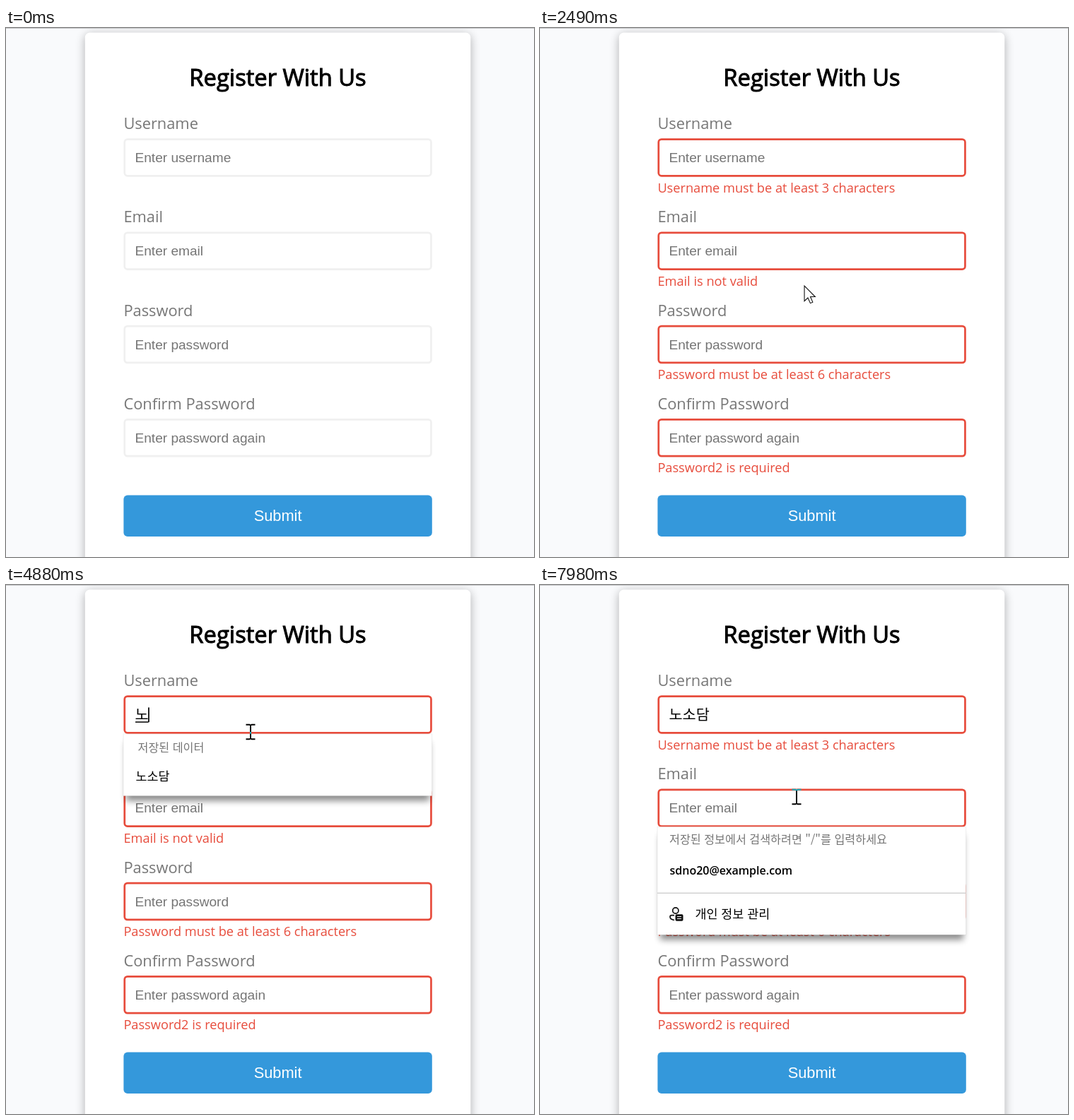
These frames come from a looping animation (747 by 749 pixels, 8000 ms). An HTML page:

```html
<!DOCTYPE html>
<html lang="ko">
<head>
<meta charset="utf-8">
<title>Register form</title>
<style>
  html, body { margin: 0; width: 100%; height: 100%; overflow: hidden; background: #f9fafc; }
  svg { display: block; width: 100%; height: 100%; }
  text { white-space: pre; }
  .ui { font-family: "Open Sans", "Noto Sans", sans-serif; }
  .arial { font-family: "Liberation Sans", Arial, sans-serif; }
  .ko { font-family: "Noto Sans CJK KR", "Noto Sans CJK JP", "Noto Sans CJK", sans-serif; }
  .title { font-size: 32.73px; stroke: #000; stroke-width: 1.05; text-anchor: middle; }
  .label { font-size: 21.82px; fill: #777; }
  .error { font-size: 18.18px; fill: #e74c3c; }
  .hint { font-size: 19.09px; fill: #757575; }
  .typed { font-size: 20.75px; }
  .head { font-size: 16.2px; fill: #767676; }
  .item { font-size: 17.4px; }
  #beam { mix-blend-mode: difference; }
</style>
</head>
<body>
<svg id="stage" viewBox="0 0 747 749"></svg>
<script>
const LOOP = 8000;
const LEFT = 166.4, WIDTH = 436.4, TEXT_X = 182.5, CHAR = 19.09;
const RED = "#e74c3c";
const SUBMIT_AT = 1605, EMAIL_AT = 7440;

const fields = [
  ["Username", "Enter username", "Username must be at least 3 characters"],
  ["Email", "Enter email", "Email is not valid"],
  ["Password", "Enter password", "Password must be at least 6 characters"],
  ["Confirm Password", "Enter password again", "Password2 is required"]
];
const fieldY = i => 156.2 + 132.27 * i;

const bursts = [
  [190, 820, 9], [1020, 1810, 13], [1880, 2010, 2], [2210, 2700, 8],
  [2900, 3170, 4], [3520, 3520, 1], [3790, 4070, 5], [4340, 4880, 7],
  [5140, 5630, 8], [6160, 6160, 1], [6690, 6970, 5], [7170, 7170, 1],
  [7440, 7440, 1], [7980, 7980, 1]
];

const pointer = [
  [190, 672, 708], [640, 301, 188], [955, 301, 188], [1151, 299, 216],
  [1480, 428, 719], [1612, 432, 690], [2150, 432, 690], [2700, 346, 208],
  [6620, 346, 208], [6970, 363, 300]
];

const typing = [
  [3790, "ㄴ"], [4510, "노"], [5140, "놋"], [5210, "노소"],
  [5350, "노솓"], [5420, "노소다"], [5560, "노소담"]
];

const caretOn = [[660, 1190], [2900, 3520], [3790, 4340], [4510, 6160], [6690, 7170], [7440, 7980]];

// Suggestion lists: id, fade in from/to, fade out from/to
const popups = [
  ["two", 585, 820, 1605, 2000],
  ["two", 2810, 3170, 3720, 4070],
  ["one", 4520, 4880, 5070, 5420],
  ["mail", 7439, 7440, 9000, 9001]
];

const text = (cls, x, y, str, extra = "") => `<text class="${cls}" x="${x}" y="${y}" ${extra}>${str}</text>`;

function field([label, hint, error], i) {
  const y = fieldY(i);
  return text("ui label", LEFT, y - 13.2, label) +
    `<rect class="box" x="${LEFT + 1.35}" y="${y + 1.35}" width="${WIDTH - 2.7}" height="51.8" rx="4.1" fill="#fff" stroke-width="2.7"/>` +
    text("arial hint", TEXT_X, y + 33.8, hint) +
    text("ui error", LEFT, y + 76.4, error);
}

function popup(id, y, bottom, body) {
  return `<g id="${id}">
    <rect x="170" y="${y + 12}" width="429" height="${bottom - y - 5}" filter="url(#soft)" opacity=".45"/>
    <rect x="166" y="${y}" width="436.7" height="${bottom - y}" fill="#fff" stroke="#000" stroke-opacity=".08" stroke-width=".8"/>
    ${body}</g>`;
}

const saved = text("ko head", 186.5, 235.5, "저장된 데이터") + text("ko item", 183.5, 276.5, "노소담");

const badge = `<g fill="none" stroke="#111" stroke-width="1.7">
    <circle cx="191.8" cy="461" r="4.1"/>
    <path d="M190 474.5c-4-.6-6-2.400-6-4.700 0-1.300 1-2.100 2.300-2.100H190"/></g>
  <rect x="191.500" y="466.300" width="11" height="9.400" rx="1.800" fill="#111"/>
  <path d="M194 469.600h6M194 472.500h6" stroke="#fff" stroke-width="1"/>`;

const stage = document.getElementById("stage");
stage.innerHTML = `
  <defs>
    <filter id="soft" x="-10%" y="-30%" width="120%" height="160%"><feGaussianBlur stdDeviation="5"/></filter>
    <filter id="cardSoft" x="-10%" y="-10%" width="120%" height="120%"><feGaussianBlur stdDeviation="6.8"/></filter>
  </defs>
  <rect width="747" height="749" fill="#f9fafc"/>
  <rect x="111.800" y="9.200" width="545.500" height="800" rx="6.800" opacity=".3" filter="url(#cardSoft)"/>
  <rect x="111.800" y="6.400" width="545.500" height="800" rx="6.800" fill="#fff"/>
  <rect width="747" height="1" fill="#c6c7c9"/>
  ${text("ui title", 384.5, 82, "Register With Us")}
  ${fields.map(field).join("")}
  <rect x="${LEFT}" y="661.600" width="${WIDTH}" height="58.300" rx="5.450" fill="#3498db"/>
  ${text("arial", 384.6, 698.3, "Submit", 'font-size="21.82" fill="#fff" text-anchor="middle"')}
  ${text("ko typed", TEXT_X, 191, "", 'id="typed"')}
  <rect id="underline" y="193.300" width="18.500" height="1.500"/>
  <rect id="caret" width="1.700" height="20.800"/>
  ${popup("two", 210.8, 345.5, saved + text("ui", 183.5, 323.5, "sodam", 'font-size="15.6"'))}
  ${popup("one", 210.8, 298.6, saved)}
  ${popup("mail", 342.2, 495.3,
    text("ko head", 183, 366, '저장된 정보에서 검색하려면 "/"를 입력하세요') +
    text("ui", 183.5, 410, "sdno20@example.com", 'font-size="16" font-weight="600"') +
    '<path d="M166 436.200h436.700" stroke="#d2d2d2" stroke-width="1.500"/>' + badge +
    text("ko item", 219.5, 472, "개인 정보 관리"))}
  <path id="arrow" d="M0 0V21.500L4.900 16.900 8.400 24.500 11.800 23 8.500 15.400H15.300Z" fill="#fff" stroke="#111" stroke-width="1.100"/>
  <g id="hand" fill="#fff" stroke="#111" stroke-width="1.300" stroke-linejoin="round">
    <path d="M-2.800 2.500a2.600 2.600 0 0 1 5.200 0V11c0-2.600 4-2.400 4.200.4.400-2 3.600-1.600 3.800.8.600-1.400 2.800-1 2.800 1.200V20c0 4-2 5-2 8H-3.200c0-3-2.800-5-4.600-9-1.400-2.600-2-4-.2-5 1.600-.8 3 .6 5.200 3.600Z"/>
    <path d="M2.400 10.500v4.500M6.600 11.400v4M10.400 12.200v3.500"/>
  </g>
  <path id="beam" d="M-6.500-10.300H-1.500L0-9.300 1.500-10.300H6.500M0-9.300V9.300M-6.500 10.300H-1.500L0 9.300 1.500 10.300H6.500" fill="none" stroke="#fff" stroke-width="1.900"/>`;

const $ = id => document.getElementById(id);
const boxes = stage.querySelectorAll(".box");
const hints = stage.querySelectorAll(".hint");
const errors = stage.querySelectorAll(".error");

const clamp = v => Math.max(0, Math.min(1, v));
const ramp = (t, a, b) => clamp((t - a) / (b - a));
const show = (el, on) => el.setAttribute("visibility", on ? "visible" : "hidden");

function snap(t) {
  const burst = bursts.filter(b => b[0] <= t).pop();
  if (!burst) return 0;
  const [a, b, n] = burst;
  if (n === 1) return a;
  const gap = (b - a) / (n - 1);
  return a + gap * Math.min(n - 1, Math.floor((t - a) / gap + 1e-6));
}

function pointerAt(t) {
  const next = pointer.findIndex(k => k[0] > t);
  if (next < 0) return pointer[pointer.length - 1].slice(1);
  const [t0, x0, y0] = pointer[Math.max(0, next - 1)];
  const [t1, x1, y1] = pointer[next];
  const u = ramp(t, t0, t1), e = u * u * (3 - 2 * u);
  return [x0 + (x1 - x0) * e, y0 + (y1 - y0) * e];
}

function pointerKind(x, y, listOpen) {
  if (x < LEFT || x > LEFT + WIDTH) return "arrow";
  if (y > 661 && y < 720) return "hand";
  if (listOpen && y > 211 && y < 345) return "arrow";
  return fields.some((_, i) => y > fieldY(i) && y < fieldY(i) + 54.5) ? "beam" : "arrow";
}

function drawPopups(t) {
  for (const id of ["two", "one", "mail"]) show($(id), false);
  let open = false;
  for (const [id, in0, in1, out0, out1] of popups) {
    const alpha = ramp(t, in0, in1) * (1 - ramp(t, out0, out1));
    if (!alpha) continue;
    open = id !== "mail" && t < out0;
    const el = $(id);
    show(el, true);
    el.setAttribute("opacity", alpha);
    el.setAttribute("transform", t >= out0 ? "translate(4.5 2)" : "");
  }
  return open;
}

function drawInput(t) {
  const key = typing.filter(k => k[0] <= t).pop();
  const value = key ? key[1] : "";
  const end = TEXT_X + CHAR * value.length;
  const onEmail = t >= EMAIL_AT;
  $("typed").textContent = value;
  show(hints[0], !value);
  show($("underline"), value && !onEmail);
  $("underline").setAttribute("x", end - CHAR + 0.5);
  show($("caret"), caretOn.some(([a, b]) => t >= a && t < b));
  $("caret").setAttribute("x", onEmail ? TEXT_X + 0.5 : end + 0.3 - (value ? 0.8 : 0));
  $("caret").setAttribute("y", onEmail ? 305.3 : 173.4);
}

function draw(time) {
  const t = snap(time);
  const failed = t >= SUBMIT_AT;
  boxes.forEach((box, i) => {
    const focus = i === 0 && t >= 660;
    box.setAttribute("stroke", failed ? RED : focus ? "#777" : "#f0f0f0");
  });
  errors.forEach(el => show(el, failed));
  drawInput(t);
  const open = drawPopups(t);

  const [x, y] = pointerAt(t);
  const kind = pointerKind(x, y, open);
  for (const id of ["arrow", "hand", "beam"]) {
    show($(id), t >= 190 && id === kind);
    $(id).setAttribute("transform", `translate(${x} ${y})`);
  }
}

const start = performance.now();
function tick() {
  draw((performance.now() - start) % LOOP);
  requestAnimationFrame(tick);
}
tick();
</script>
</body>
</html>
```
